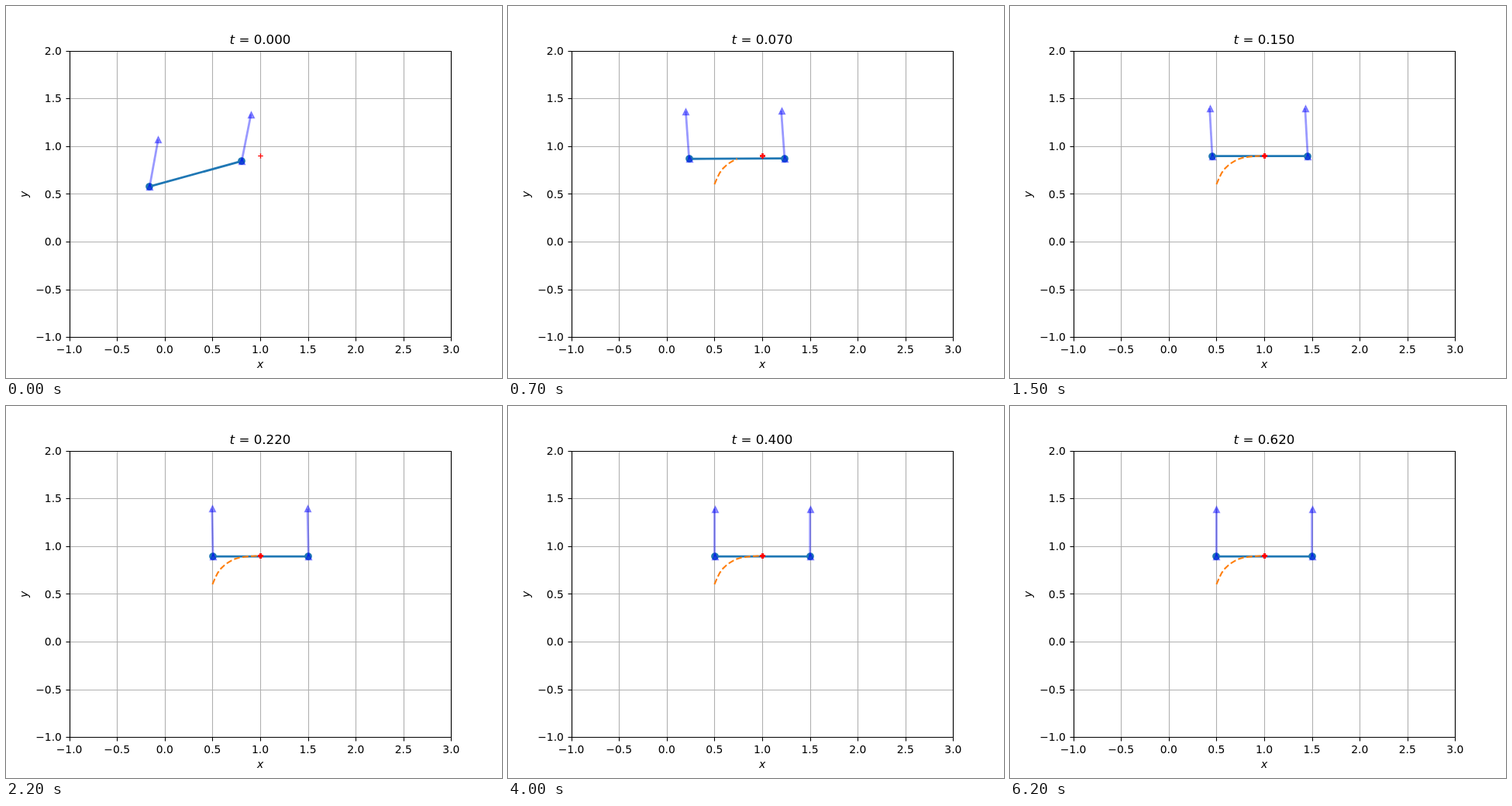
Write an HTML page that moves like this. It is 640 px wide and 480 px high and loops after 6.3 s.

```html
<!DOCTYPE html>
<html lang="en">
<head>
<meta charset="utf-8">
<title>Planar body tracking</title>
<style>
  html, body { margin: 0; width: 100%; height: 100%; overflow: hidden; background: #fff; }
  svg { display: block; width: 640px; height: 480px; }
  text { font-family: "DejaVu Sans", sans-serif; font-size: 13.89px; }
  .it { font-style: italic; }
  #title { font-size: 16.67px; }
  path, polyline { fill: none; }
  .grid { stroke: #b0b0b0; stroke-width: 1.11; }
  .axis { stroke: #000; stroke-width: 1.11; }
  .body { stroke: #1f77b4; stroke-width: 2.78; }
  .hub { fill: #1f77b4; stroke: #1f77b4; stroke-width: 1.39; }
  .trail { stroke: #ff7f0e; stroke-width: 2.08; stroke-dasharray: 7.71 3.33; }
  .thrust { stroke: #00f; stroke-opacity: .4; stroke-width: 2.78; }
  .tri { fill: #00f; fill-opacity: .4; stroke: #00f; stroke-opacity: .4; stroke-width: 1.39; }
  .goal { stroke: #f00; }
</style>
</head>
<body>
<svg viewBox="0 0 640 480">
  <g id="grid"></g>
  <path id="bar" class="body"/>
  <g id="hubs"></g>
  <polyline id="trail" class="trail"/>
  <g id="arrows"></g>
  <path id="halo" class="goal" stroke-width="3" d="M325 193.5h7M328.5 190v7"/>
  <path class="goal" stroke-width="1" d="M325.5 193.5h6M328.5 190.5v6"/>
  <g id="frame"></g>
  <text id="title" x="328" y="49" text-anchor="middle"><tspan class="it">t</tspan> = <tspan id="clock">0.000</tspan></text>
  <text class="it" x="328" y="467" text-anchor="middle">x</text>
  <text class="it" transform="translate(28 243) rotate(-90)" text-anchor="middle">y</text>
</svg>
<script>
const STEP = 100, STEPS = 63, UNIT = 123.2;
const $ = id => document.getElementById(id);
const px = x => 204.8 + UNIT * x;
const py = y => 304 - UNIT * y;
const snap = v => Math.floor(v + 0.5);

function add(parent, tag, attrs, text) {
  const el = document.createElementNS("http://www.w3.org/2000/svg", tag);
  for (const k in attrs) el.setAttribute(k, attrs[k]);
  if (text) el.textContent = text;
  return $(parent).appendChild(el);
}

// Axes, grid and tick labels
const label = v => v.toFixed(1).replace("-", "\u2212");
for (let x = -1; x <= 3; x += 0.5) {
  const p = snap(px(x)) + 0.5;
  add("grid", "path", { class: "grid", d: `M${p} 58V427` });
  add("frame", "path", { class: "axis", d: `M${p} 427.5v5` });
  add("frame", "text", { x: px(x), y: 448, "text-anchor": "middle" }, label(x));
}
for (let y = -1; y <= 2; y += 0.5) {
  const p = snap(py(y)) + 0.5;
  add("grid", "path", { class: "grid", d: `M82 ${p}H574` });
  add("frame", "path", { class: "axis", d: `M82.5 ${p}h-5` });
  add("frame", "text", { x: 71.9, y: py(y) + 5.2, "text-anchor": "end" }, label(y));
}
add("frame", "path", { class: "axis", d: "M82.5 58.5H574.5V427.5H82.5z" });

const TRI = "M.5-3.5L-3.5 4.5H4.5z";
const sides = [-1, 1].map(sign => ({
  sign,
  hub: add("hubs", "circle", { class: "hub", r: 4.17 }),
  shaft: add("arrows", "path", { class: "thrust" }),
  base: add("arrows", "path", { class: "tri", d: TRI }),
  tip: add("arrows", "path", { class: "tri", d: TRI })
}));

// Smooth curve through [time, value] keys
function curve(keys) {
  const slope = i => {
    const a = keys[Math.max(i - 1, 0)], b = keys[Math.min(i + 1, keys.length - 1)];
    return (b[1] - a[1]) / (b[0] - a[0]);
  };
  return t => {
    let i = 0;
    while (i < keys.length - 2 && t > keys[i + 1][0]) i++;
    const [t0, v0] = keys[i], [t1, v1] = keys[i + 1];
    const h = t1 - t0, u = Math.min((t - t0) / h, 1), w = 1 - u;
    return w * w * ((1 + 2 * u) * v0 + u * h * slope(i)) +
           u * u * ((1 + 2 * w) * v1 - w * h * slope(i + 1));
  };
}

const pathX = curve([[0, .5], [.02, .555], [.04, .625], [.07, .738], [.1, .85], [.14, .946],
  [.15, .956], [.18, .987], [.21, 1.003], [.25, 1.008], [.3, 1.0045], [.4, 1.001], [.5, 1], [.63, 1]]);
const pathY = curve([[0, .6], [.02, .72], [.04, .8], [.07, .867], [.1, .889], [.14, .8963],
  [.18, .895], [.22, .8922], [.3, .8915], [.63, .8915]]);
const tilt = curve([[0, .188], [.03, 0], [.07, -.07], [.11, -.073], [.15, -.055],
  [.22, -.02], [.3, -.003], [.4, 0], [.63, 0]]);

function place(el, x, y) {
  el.setAttribute("transform", `translate(${snap(x)} ${snap(y)})`);
}

function draw(n) {
  const t = n / 100, lag = Math.exp(-t / 0.018);
  const x = pathX(t) - 0.176 * lag, y = pathY(t) + 0.11 * lag, turn = 0.269 * lag;
  const ends = sides.map(s => {
    const ex = px(x + s.sign * Math.cos(turn) / 2);
    const ey = py(y + s.sign * Math.sin(turn) / 2);
    const a = tilt(t) + s.sign * 0.008 * lag;
    const tx = ex + UNIT / 2 * Math.sin(a), ty = ey - UNIT / 2 * Math.cos(a);
    place(s.hub, ex, ey);
    place(s.base, ex, ey);
    place(s.tip, tx, ty);
    s.shaft.setAttribute("d", `M${ex} ${ey}L${tx} ${ty}`);
    return `${ex} ${ey}`;
  });
  $("bar").setAttribute("d", `M${ends.join("L")}`);

  const pts = [];
  for (let k = 0; k <= n; k++) pts.push(`${px(pathX(k / 100))},${py(pathY(k / 100))}`);
  $("trail").setAttribute("points", n ? pts.join(" ") : "");

  // The goal is overdrawn at each step, so its soft edge grows solid
  $("halo").setAttribute("opacity", 1 - 0.805 ** (n + 1));
  $("clock").textContent = t.toFixed(3);
}

let start, last = -1;
function tick(now) {
  start ??= now;
  const n = Math.floor((now - start) / STEP) % STEPS;
  if (n !== last) draw(last = n);
  requestAnimationFrame(tick);
}
draw(0);
requestAnimationFrame(tick);
</script>
</body>
</html>
```
